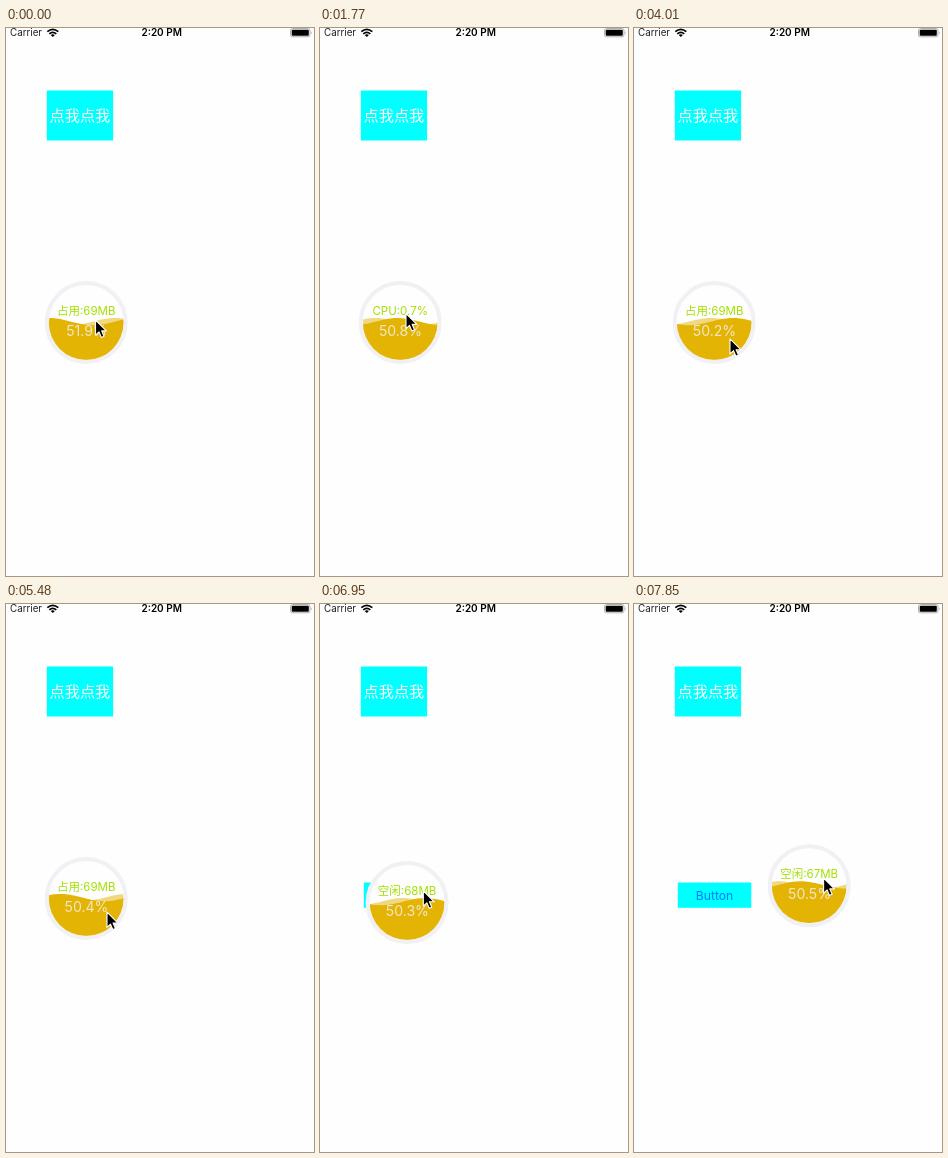
Write an HTML page that moves like this. It is 308 by 548 pixels and loops after 8 s.

```html
<!DOCTYPE html>
<html lang="zh">
<head>
<meta charset="utf-8">
<style>
  html, body { margin: 0; width: 100%; height: 100%; overflow: hidden; background: #fefefe; }
  svg { display: block; width: 100%; height: 100%; }
  text { font-family: Inter, "Noto Sans CJK SC", "Noto Sans CJK", sans-serif; text-anchor: middle; }
</style>
</head>
<body>
<svg viewBox="0 0 308 548">
  <clipPath id="inside"><circle r="37.3"/></clipPath>

  <!-- status bar -->
  <text x="4" y="8.1" font-size="9.8" fill="#222" style="text-anchor:start">Carrier</text>
  <g fill="none" stroke="#000" stroke-width="1.7">
    <path d="M41.3 3.6Q46.8-1 52.3 3.6M43.3 5.9Q46.8 2.9 50.3 5.9"/>
    <path d="M46.8 9L44.7 7Q46.8 5.4 48.9 7Z" fill="#000" stroke="none"/>
  </g>
  <text x="155.7" y="8.1" font-size="10" font-weight="600" fill="#000">2:20 PM</text>
  <rect x="284.5" y=".6" width="19.5" height="8.2" rx="2" fill="none" stroke="#999" stroke-width=".8"/>
  <rect x="285.7" y="1.7" width="17.1" height="6" rx="1"/>
  <path d="M305 3.2q1.4 1.5 0 3z" fill="#999"/>

  <rect x="40.8" y="62.5" width="66.3" height="50" fill="#0ff"/>
  <text x="73.9" y="92.7" font-size="15.2" font-weight="300" fill="#fff">点我点我</text>
  <rect x="43.8" y="278.5" width="73.5" height="25.3" fill="#0ff"/>
  <text x="80.5" y="295.6" font-size="12.2" fill="#007aff">Button</text>

  <g id="ball">
    <circle r="39.5" fill="#fefefe" stroke="#f1f1f5" stroke-width="4"/>
    <g clip-path="url(#inside)" fill="#e4b404">
      <path id="back" opacity=".5"/>
      <path id="front"/>
    </g>
    <text id="label" y="-8" font-size="11.5" fill="#a4e000"></text>
    <text id="percent" x=".3" y="13.4" font-size="14.1" fill="#f1e6c8"></text>
  </g>

  <path id="cursor" d="M0 0V15.2L3.5 11.9L5.9 17.4L8.5 16.3L6.1 10.9H10.9Z"
        stroke="#fff" stroke-width="1.1" stroke-linejoin="round"/>
</svg>
<script>
const LOOP = 8000, STEPS = 54, STEP = LOOP / STEPS;
const WAVELENGTH = 88, AMPLITUDE = 3.6, DRIFT = 0.03;
const READING_TIME = 1300, DRAG_START = 6765, DRAG_TIME = 1085;

const readings = [
  '占用:69MB 51.9%', 'CPU:0.7% 50.8%', '60fps 51.0%', '占用:69MB 50.2%',
  '占用:69MB 50.4%', '空闲:68MB 50.3%', '空闲:67MB 50.5%'
];
const home = [80.2, 294.5];
const pressPoint = [96.6, 282.5];
const cursorMoves = [
  { at: 300, to: [86, 285.5] },
  { at: 2800, to: [96, 310.8] },
  { at: 4700, to: [101, 308.2] },
  { at: 5490, to: [125, 302] },
  { at: 5900, to: pressPoint }
];

const el = id => document.getElementById(id);
const add = (a, b) => a.map((v, i) => v + b[i]);
const mix = (a, b, u) => a.map((v, i) => v + (b[i] - v) * u);
const smooth = u => {
  u = Math.min(1, Math.max(0, u));
  return u * u * (3 - 2 * u);
};

// Cubic curve starting at zero
const bezier = (b, c, d, u) =>
  3 * u * (1 - u) ** 2 * b + 3 * u * u * (1 - u) * c + u ** 3 * d;

function wave(crest) {
  let d = 'M-40 40';
  for (let x = -40; x <= 40; x += 2) {
    const y = -0.9 - AMPLITUDE * Math.cos((x - crest) * 2 * Math.PI / WAVELENGTH);
    d += `L${x} ${y.toFixed(2)}`;
  }
  return d + 'L40 40Z';
}

function place(id, [x, y]) {
  el(id).setAttribute('transform', `translate(${x} ${y})`);
}

function draw(time) {
  // The picture advances in even steps, slightly ahead of the clock
  const step = Math.min(STEPS - 1, Math.floor((time % LOOP + 18) / STEP));
  const t = step * STEP;

  const crest = -37.2 - DRIFT * t;
  el('front').setAttribute('d', wave(crest));
  el('back').setAttribute('d', wave(crest - WAVELENGTH / 4));

  const [label, percent] = readings[Math.floor((t + 500) / READING_TIME)].split(' ');
  el('label').textContent = label;
  el('percent').textContent = percent;

  const u = smooth((t - DRAG_START) / DRAG_TIME);
  const drag = [bezier(23, 85, 95, u), bezier(29, -109, -12.7, u)];
  const pointer = cursorMoves.reduce(
    (p, move) => mix(p, move.to, smooth((t - move.at) / 500)), [89.5, 292]);
  const slip = [-2 * u, 4.2 * u];
  place('ball', add(home, drag));
  place('cursor', add(add(pointer, drag), slip));
}

const start = performance.now();
function tick() {
  draw(performance.now() - start);
  requestAnimationFrame(tick);
}
tick();
</script>
</body>
</html>
```
